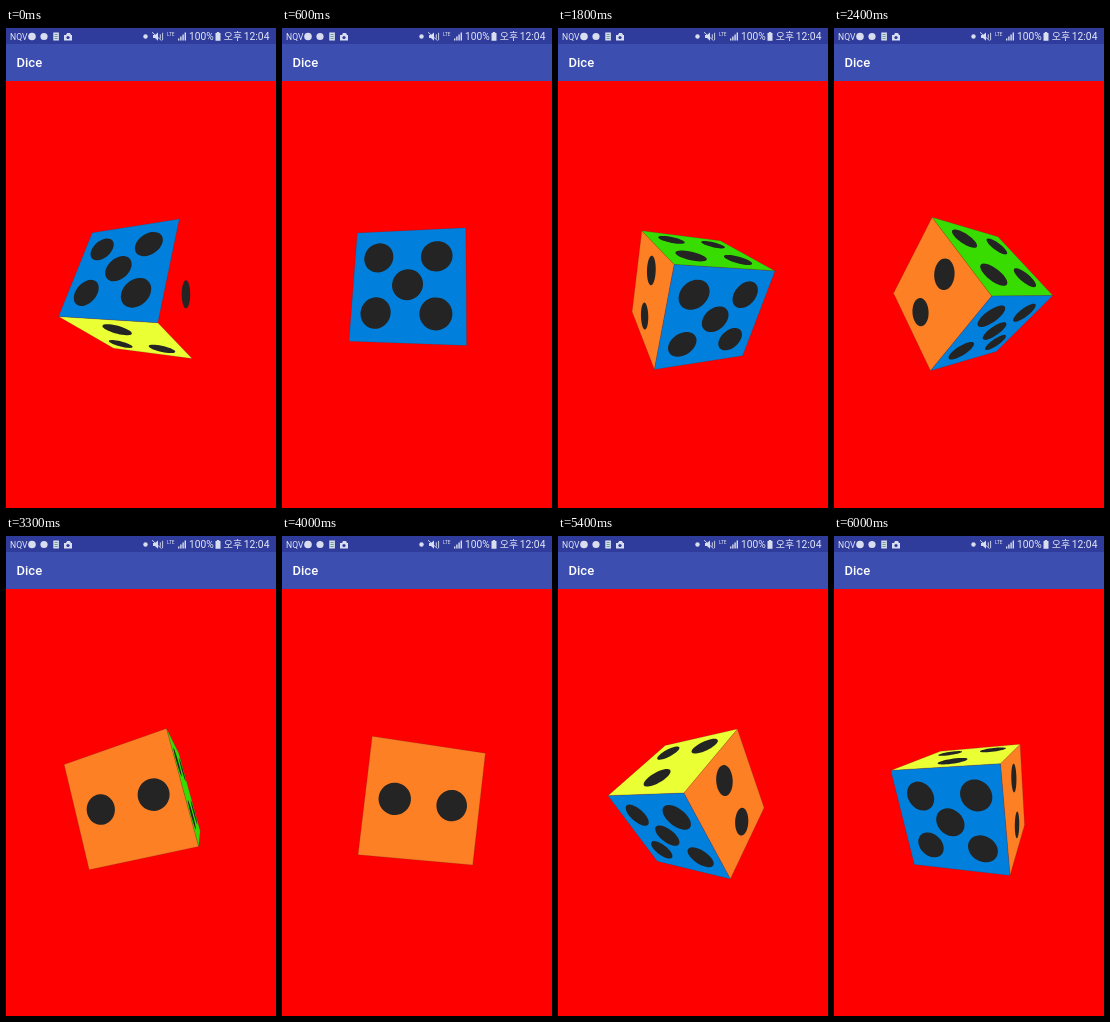
Write an HTML page that moves like this. It is 270x480 px and loops after 6100 ms.

```html
<!DOCTYPE html>
<html lang="ko">
<head>
<meta charset="utf-8">
<title>Dice</title>
<style>
  html, body { margin: 0; width: 100%; height: 100%; overflow: hidden; background: #f00; }
  svg { display: block; width: 100vw; height: 100vh; }
  text { font-family: Roboto, "Noto Sans CJK KR", "Noto Sans CJK", sans-serif; fill: #e4e7f5; }
  .title { font-size: 13px; font-weight: 500; fill: #fff; }
  .icon { fill: #d9ddf0; }
  .line { fill: none; stroke: #d9ddf0; stroke-width: .9; }
</style>
</head>
<body>
<svg viewBox="0 0 270 480">
  <rect width="270" height="480" fill="#f00"/>
  <g id="die"></g>

  <rect width="270" height="53" fill="#3c4eb0"/>
  <rect width="270" height="16" fill="#2f3c9b"/>
  <text class="title" x="10.5" y="39">Dice</text>

  <text x="4" y="11.8" font-size="8.6">NQV</text>
  <circle class="icon" cx="26" cy="8.5" r="3.8"/>
  <circle class="icon" cx="38" cy="8.5" r="3.6"/>
  <rect class="icon" x="47.3" y="4.5" width="5.6" height="8"/>
  <path d="M48.5 6.5h3.2M48.5 8.5h3.2M48.5 10.5h3.2" stroke="#5d9a86" stroke-width=".9"/>
  <path class="icon" d="M58 7h2l1-2h3l1 2h1v5.5h-8z"/>
  <circle cx="62" cy="9.5" r="1.6" fill="#2f3c9b"/>

  <circle class="icon" cx="139.5" cy="8.5" r="2.2"/>
  <path class="icon" d="M147 7h2l3-2.6v8.4L149 10h-2z"/>
  <path class="line" d="M146 4.2l9.5 8.4M154.3 6.3v4.4M156.6 4.8v7.4"/>
  <text x="161" y="7.8" font-size="4.8">LTE</text>
  <path class="icon" d="M172 12.5v-2h1.4v2zM174.2 12.5v-4h1.4v4zM176.4 12.5v-6h1.4v6zM178.6 12.5v-8h1.4v8z"/>
  <text x="183" y="12.2" font-size="10.2">100%</text>
  <path class="icon" d="M209.5 5h1.3v-1h2.4v1h1.3v7.8h-5z"/>
  <text x="217.8" y="12.2" font-size="10">오후</text>
  <text x="237.8" y="12.2" font-size="10.3">12:04</text>
</svg>
<script>
const LOOP = 6100, STEP = 100;
const FOCAL = 232, DIST = 5, CX = 135, CY = 266.3;
const PIP = 0.275, SIDES = 36;

// [time in ms, angle in degrees]
const SPIN = [[0, 208.2], [1300, 168.3], [2400, 134], [3300, 105], [4000, 83.3], [4800, 58.2], [6100, 18.1]];

// Each face: normal and its two in-plane axes (0 orange, 1 yellow, 2 blue), pips as [u, v]
const FACES = [
  { color: '#fd8024', axis: 0, sign: 1, u: 1, v: 2, pips: [[.5, 0], [-.5, 0]] },
  { color: '#ff0000', axis: 0, sign: -1, u: 1, v: 2, pips: [[0, 0]] },
  { color: '#ebff35', axis: 1, sign: 1, u: 0, v: 2, pips: [[.5, -.5], [-.5, -.5], [0, .5]] },
  { color: '#38dc00', axis: 1, sign: -1, u: 0, v: 2, pips: [[.5, .5], [.5, -.5], [-.5, .5], [-.5, -.5]] },
  { color: '#0080dc', axis: 2, sign: 1, u: 0, v: 1, pips: [[.55, .5], [.55, -.5], [0, 0], [-.5, .5], [-.5, -.5]] }
];
const CORNERS = [[-1, -1], [1, -1], [1, 1], [-1, 1]];
const RING = Array.from({ length: SIDES }, (_, i) => {
  const a = i / SIDES * 2 * Math.PI;
  return [PIP * Math.cos(a), PIP * Math.sin(a)];
});

const die = document.getElementById('die');
function addPath(fill) {
  const p = document.createElementNS('http://www.w3.org/2000/svg', 'path');
  p.setAttribute('fill', fill);
  return die.appendChild(p);
}
for (const face of FACES) {
  face.body = addPath(face.color);
  face.dots = addPath('#232423');
  if (face.color !== '#ff0000') {
    face.body.setAttribute('stroke', 'rgba(40,40,40,.35)');
    face.body.setAttribute('stroke-width', '.5');
  }
}

function angleAt(t) {
  let i = 1;
  while (i < SPIN.length - 1 && t > SPIN[i][0]) i++;
  const [t0, a0] = SPIN[i - 1], [t1, a1] = SPIN[i];
  return (a0 + (a1 - a0) * (t - t0) / (t1 - t0)) * Math.PI / 180;
}

// Turn by a about the die's own x axis, then by -a about the vertical
function axesAt(a) {
  const s = Math.sin(a), c = Math.cos(a);
  return [[c, 0, s], [-s * s, c, s * c], [-s * c, -s, c * c]];
}

function outline(face, axes, points) {
  const n = axes[face.axis], u = axes[face.u], v = axes[face.v];
  return 'M' + points.map(([p, q]) => {
    const [x, y, z] = n.map((k, i) => face.sign * k + p * u[i] + q * v[i]);
    const scale = FOCAL / (DIST - z);
    return (CX + x * scale).toFixed(2) + ' ' + (CY - y * scale).toFixed(2);
  }).join('L') + 'Z';
}

function draw(t) {
  const axes = axesAt(angleAt(t));
  for (const face of FACES) {
    const visible = face.sign * axes[face.axis][2] * DIST > 1;
    face.body.setAttribute('d', visible ? outline(face, axes, CORNERS) : '');
    face.dots.setAttribute('d', visible ? face.pips.map(([p, q]) =>
      outline(face, axes, RING.map(([x, y]) => [p + x, q + y]))).join('') : '');
  }
}

const start = performance.now();
function tick() {
  const t = (performance.now() - start) % LOOP;
  draw(Math.floor(t / STEP) * STEP);
  requestAnimationFrame(tick);
}
tick();
</script>
</body>
</html>
```
